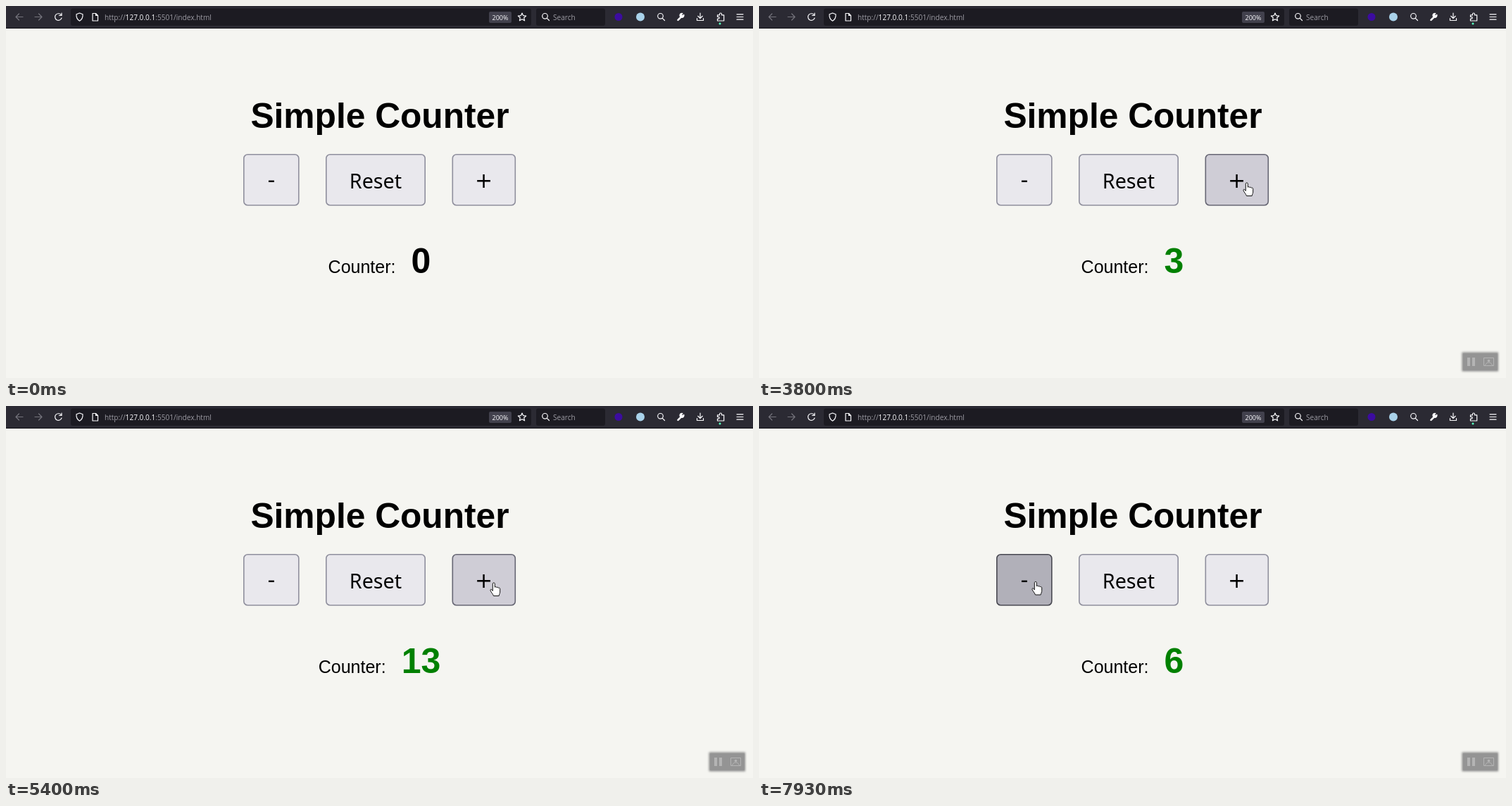
These frames come from a looping animation (1061 px wide and 528 px high, 8000 ms). An HTML page:

```html
<!DOCTYPE html>
<html lang="en">
<head>
<meta charset="utf-8">
<title>Simple Counter</title>
<style>
  html, body { margin: 0; width: 100%; height: 100%; overflow: hidden; background: #f5f5f1; }
  svg { display: block; }
  text { font-family: "Liberation Sans", Arial, sans-serif; }
  .ui { font: 10.1px "Open Sans", "Noto Sans", sans-serif; fill: #9c9ba3; }
  .ui .host { fill: #fbfbfe; }
  .icon { fill: none; stroke: #fbfbfe; stroke-width: 1.2; stroke-linecap: round; stroke-linejoin: round; }
  .dim { stroke: #74737b; }
  .big { font-size: 50px; font-weight: bold; }
  .button rect { fill: #e9e8ed; stroke: #8f8f9d; stroke-width: 1.6; }
  .button.hover rect { fill: #cfcdd6; stroke: #676774; }
  .button.active rect { fill: #b1b0b9; stroke: #484851; }
  .button text { font: 30px "DejaVu Sans", sans-serif; text-anchor: middle; }
  .button .word { font: 28.7px "Noto Sans", "Open Sans", sans-serif; }
  #cursor path { fill: #fff; stroke: #111; stroke-width: 1; stroke-linejoin: round; }
</style>
</head>
<body>
<svg width="1061" height="528" viewBox="0 0 1061 528">
  <defs>
    <filter id="soft" x="-20%" y="-30%" width="140%" height="160%"><feGaussianBlur stdDeviation="1.4"/></filter>
  </defs>

  <!-- Browser toolbar -->
  <rect width="1061" height="32" fill="#2b2a33"/>
  <rect y="31" width="1061" height="1" fill="#0f0e14"/>
  <rect x="92" y="3.500" width="654" height="24.500" rx="3" fill="#1c1b22"/>
  <rect x="753" y="3.500" width="98" height="24.500" rx="3" fill="#1c1b22"/>
  <g class="icon">
    <path class="dim" d="M24 15.500H14m4.500-4.500-4.500 4.500 4.500 4.500M41 15.500h10m-4.500-4.500 4.500 4.500-4.500 4.500"/>
    <path d="M78.500 13a4.800 4.800 0 1 0 .5 4M79 10v3.500h-3.500"/>
    <path d="M104.500 10l4.500 1.800c.3 4.500-1 7.500-4.500 9.400-3.500-1.900-4.800-4.900-4.500-9.400z"/>
    <path d="M123 10.500h4.500l3 3v7.500H123zM127.500 10.500v3h3"/>
    <path d="M733 10l1.700 3.700 4 .4-3 2.700.9 4-3.600-2.100-3.600 2.100.9-4-3-2.700 4-.4z"/>
    <path d="M768.300 17.300l3.200 3.200M932.300 17.300l3.200 3.200"/>
    <circle cx="765.500" cy="14.300" r="3.800"/>
    <circle cx="929.500" cy="14.300" r="3.800"/>
    <path d="M954.500 19.800l4.500-4.500" stroke-width="2.600"/>
    <path d="M962.800 12.300l-2 1.600-1.400-1.400 1.500-2a3 3 0 1 0 1.900 1.800z" fill="#fbfbfe"/>
    <path d="M986 10v7.500m-3.300-3.200 3.300 3.200 3.300-3.200M981.500 17.500v3h9v-3"/>
    <path d="M1010.500 12.800h3v-1.300a1.500 1.500 0 0 1 3 0v1.300h3.200v8.200h-9.200v-2.800h1.300a1.400 1.400 0 0 0 0-2.800h-1.300z"/>
    <path d="M1038 11.800h9m-9 3.700h9m-9 3.700h9"/>
  </g>
  <circle cx="870" cy="15.500" r="5.500" fill="#3c0ca0"/>
  <circle cx="901" cy="15.500" r="6" fill="#a9d2ea"/>
  <circle cx="1014" cy="25" r="1.500" fill="#54ffbd"/>
  <rect x="686" y="8" width="32" height="16" rx="2" fill="#42414d"/>
  <g class="ui">
    <text class="ui" x="140" y="20">http://<tspan class="host">127.0.0.1</tspan>:5501/index.html</text>
    <text class="ui" x="777" y="20">Search</text>
    <text class="ui host" x="702" y="19.500" text-anchor="middle" style="font-size:9px">200%</text>
  </g>

  <!-- Page -->
  <text class="big" x="531" y="173" text-anchor="middle" style="font-size:49.700px">Simple Counter</text>
  <g class="button" id="minus">
    <rect x="337.800" y="210.800" width="78" height="72" rx="5.500"/>
    <text x="377" y="257">-</text>
  </g>
  <g class="button" id="reset">
    <rect x="454.800" y="210.800" width="140.400" height="72" rx="5.500"/>
    <text class="word" x="525" y="258.500">Reset</text>
  </g>
  <g class="button" id="plus">
    <rect x="634.300" y="210.800" width="89" height="72" rx="5.500"/>
    <text x="678.500" y="258">+</text>
  </g>
  <g id="counter">
    <text x="457.600" y="378.600" font-size="25">Counter:</text>
    <text class="big" id="value" x="575.600" y="379">0</text>
  </g>

  <!-- Recorder controls -->
  <g id="recorder">
    <rect x="998.500" y="491.500" width="51.500" height="27" fill="#8c8c8c" filter="url(#soft)"/>
    <rect x="1000" y="493" width="48.500" height="24" fill="#949494"/>
    <path d="M1006 499h4v12h-4zm7 0h4v12h-4z" fill="#b4b4b4"/>
    <path d="M1029.500 499.500h14v11h-14zM1031 510l3.500-4h4l3.500 4" fill="none" stroke="#b4b4b4"/>
    <circle cx="1036.500" cy="503.500" r="1.800" fill="#b4b4b4"/>
  </g>

  <g id="cursor">
    <path id="arrow" d="M0 0V16l3.700-3.400 2.500 5.600 2.600-1.100-2.500-5.500H11.500z"/>
    <path id="hand" d="M-1.700 1.200C-1.700-.6 1.300-.6 1.300 1.200V6.200c.6-1 2.500-.7 2.700.5.600-.8 2.300-.5 2.500.6.700-.6 2.200-.2 2.200 1.200V13c0 2-1.200 3-1.600 5.500H-.5C-1.500 15.500-4 13.500-5 10.800c-.5-1.500 1.200-2 2-1l1.300 1.600z"/>
  </g>
</svg>
<script>
const LOOP = 8000, FPS = 15;
const $ = id => document.getElementById(id);

// [press, release] in ticks of 1/15 s
const plusClicks = [
  [31, 35], [37, 43], [47, 52], [58, 59], [61, 62], [63, 64], [65, 66],
  [68, 69], [71, 72], [74, 75], [76, 77], [78, 79], [80, 81], [82, 83]
];
const minusClicks = [
  [101, 102], [103, 104], [105, 106], [108, 109], [111, 112],
  [113, 114], [115, 116], [117, 118], [119, 121]
];
const buttons = [
  { id: "minus", left: 337, right: 416.500, clicks: minusClicks },
  { id: "reset", left: 454, right: 596, clicks: [] },
  { id: "plus", left: 633.500, right: 724, clicks: plusClicks }
];

const clamp = v => Math.min(1, Math.max(0, v));
const smooth = (t, from, to) => {
  const p = clamp((t - from) / (to - from));
  return p * p * (3 - 2 * p);
};
const mix = (a, b, p) => a + (b - a) * p;
const released = (clicks, tick) => clicks.filter(c => c[1] <= tick).length;
const pressed = (clicks, tick) => clicks.some(c => c[0] <= tick && tick < c[1]);

function cursorAt(t) {
  const enter = smooth(t, 1000, 1870), cross = smooth(t, 5660, 6730);
  return {
    x: mix(mix(717, 693, enter), 393, cross),
    y: mix(mix(526, 251, enter), 249.500, cross)
  };
}

function draw(ms) {
  const tick = Math.floor((ms + 4) * FPS / 1000);
  const t = tick * 1000 / FPS;
  const { x, y } = cursorAt(t);
  let overButton = false;

  for (const b of buttons) {
    const hover = x > b.left && x < b.right && y > 210 && y < 284;
    const active = hover && pressed(b.clicks, tick);
    overButton = overButton || hover;
    $(b.id).setAttribute("class", "button" + (hover ? " hover" : "") + (active ? " active" : ""));
  }

  const count = released(plusClicks, tick) - released(minusClicks, tick);
  $("value").textContent = count;
  $("value").setAttribute("fill", count > 0 ? "#008000" : "#000");
  $("counter").setAttribute("transform", `translate(${count > 9 ? -13.900 : 0} 0)`);

  $("cursor").setAttribute("transform", `translate(${x} ${y})`);
  $("cursor").style.display = tick < 16 ? "none" : "";
  $("hand").style.display = overButton ? "" : "none";
  $("arrow").style.display = overButton ? "none" : "";
  $("recorder").setAttribute("opacity", clamp(t / 333));
}

function loop() {
  draw(performance.now() % LOOP);
  requestAnimationFrame(loop);
}
loop();
</script>
</body>
</html>
```
